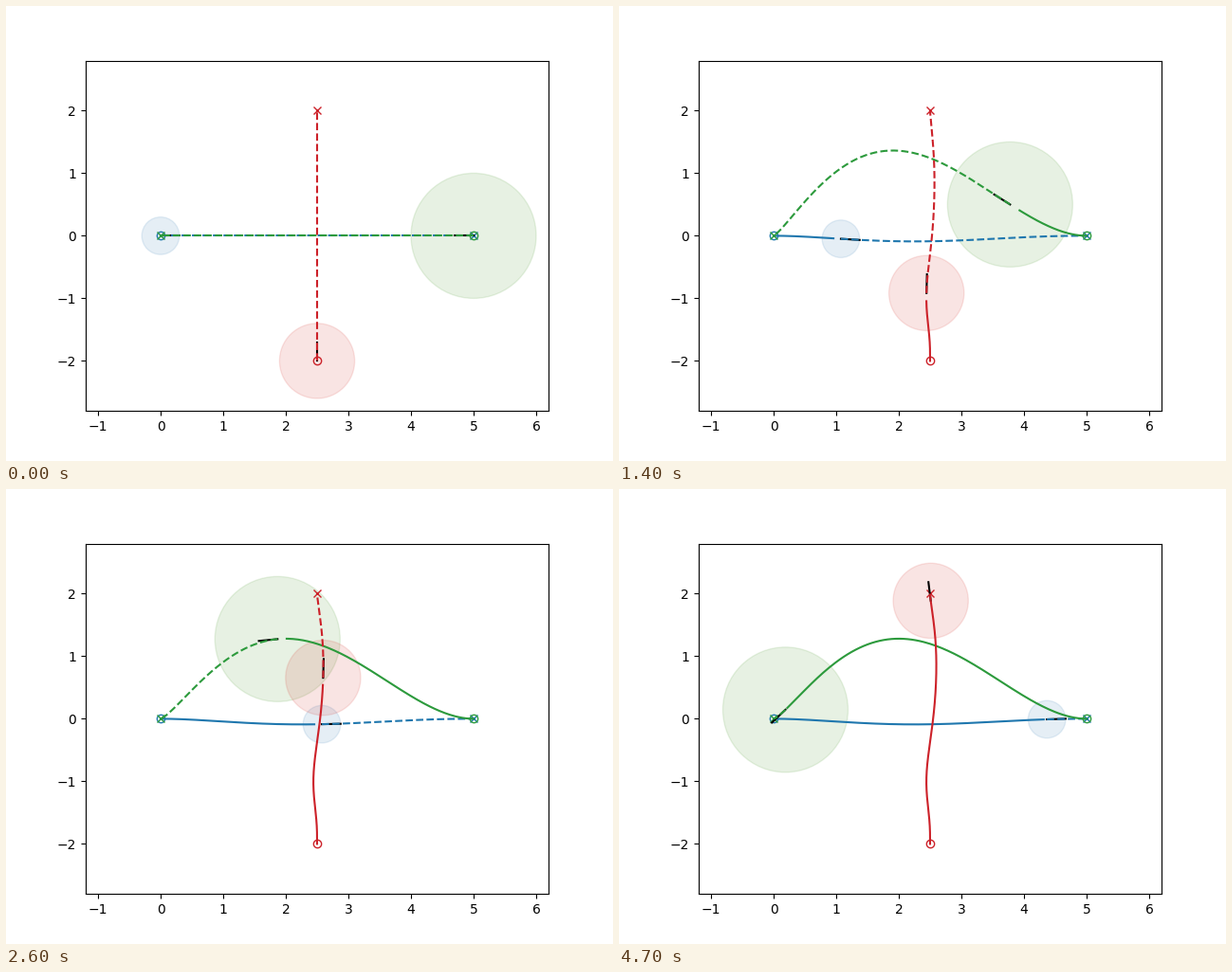
These frames come from a looping animation (640 by 480 pixels, 4800 ms). A matplotlib script:

```python
import matplotlib.pyplot as plt
import numpy as np
from matplotlib.animation import FuncAnimation

FRAMES = 48
HEADING = 0.3
REPLAN = [0, 8, 14, 22]  # steps at which the swerves below are fully adopted


def bump(u, height, peak, sharp):
    """Skewed hump on 0..1 that reaches its height at u = peak."""
    hump = (u / peak) ** peak * ((1 - u) / (1 - peak)) ** (1 - peak)
    return height * hump ** sharp


class Agent:
    """Disc that travels from start to goal and swerves to its left or right."""

    def __init__(self, ax, color, tint, radius, start, goal, pace, swerves):
        self.start = np.array(start, float)
        self.way = np.array(goal, float) - self.start
        self.left = np.array([-self.way[1], self.way[0]]) / np.hypot(*self.way)
        self.swerves = swerves
        tau, power = pace
        self.progress = 1 - np.exp(-(np.arange(FRAMES) / tau) ** power)

        ax.plot(*start, "o", color=color, mfc="none")
        ax.plot(*goal, "x", color=color)
        self.body = ax.add_patch(plt.Circle(start, radius, color=tint, alpha=0.12))
        self.nose, = ax.plot([], [], color="black")
        self.plan, = ax.plot([], [], "--", color=color)
        self.trail, = ax.plot([], [], color=color)

    def offset(self, u, k):
        return sum(bump(u, np.interp(k, REPLAN, heights),
                        np.interp(k, REPLAN, peaks), sharp)
                   for heights, peaks, sharp in self.swerves)

    def points(self, u, side):
        return self.start + np.outer(u, self.way) + np.outer(side, self.left)

    def update(self, k):
        # The plan starts on the driven path and eases into its own shape.
        w = np.linspace(0, 1, 150)
        u = self.progress[k] + w * (1 - self.progress[k])
        side = self.offset(u, k)
        side += (self.offset(u[0], REPLAN[-1]) - side[0]) * (1 - w) ** 3
        ahead = self.points(u, side)

        here, step = ahead[0], ahead[1] - ahead[0]
        tip = here + HEADING * step / np.hypot(*step)
        self.body.center = here
        self.nose.set_data(*np.transpose([here, tip]))
        self.plan.set_data(*ahead.T)

        past = np.linspace(0, self.progress[max(k - 1, 0)], 150)
        self.trail.set_data(*self.points(past, self.offset(past, REPLAN[-1])).T)
        return self.body, self.nose, self.plan, self.trail


fig, ax = plt.subplots(figsize=(6.4, 4.8), dpi=100)
ax.set_aspect("equal")
ax.set_xlim(-1.2, 6.2)
ax.set_ylim(-2.8, 2.8)

# Each swerve: heights and peak places per replan, then sharpness.
agents = [
    Agent(ax, "#1f77ae", "#2f7ab4", 0.3, (0, 0), (5, 0), (31.2, 1.77),
          [((0, -0.41, -0.09, -0.09), (0.53, 0.53, 0.45, 0.45), 4.5)]),
    Agent(ax, "#2c9a3c", "#3f931e", 1, (5, 0), (0, 0), (26.2, 2.03),
          [((0, -0.92, -1.36, -1.28), (0.55, 0.55, 0.62, 0.6), 3.3)]),
    Agent(ax, "#cc2129", "#d5261e", 0.6, (2.5, -2), (2.5, 2), (24.9, 2),
          [((0, 0, 0.07, 0.07), (0.27,) * 4, 14),
           ((0, 0.245, -0.07, -0.1), (0.71,) * 4, 5)]),
]


def draw(k):
    return [artist for agent in agents for artist in agent.update(k)]


anim = FuncAnimation(fig, draw, frames=FRAMES, interval=100, repeat=True,
                     repeat_delay=0)
plt.show()
```
